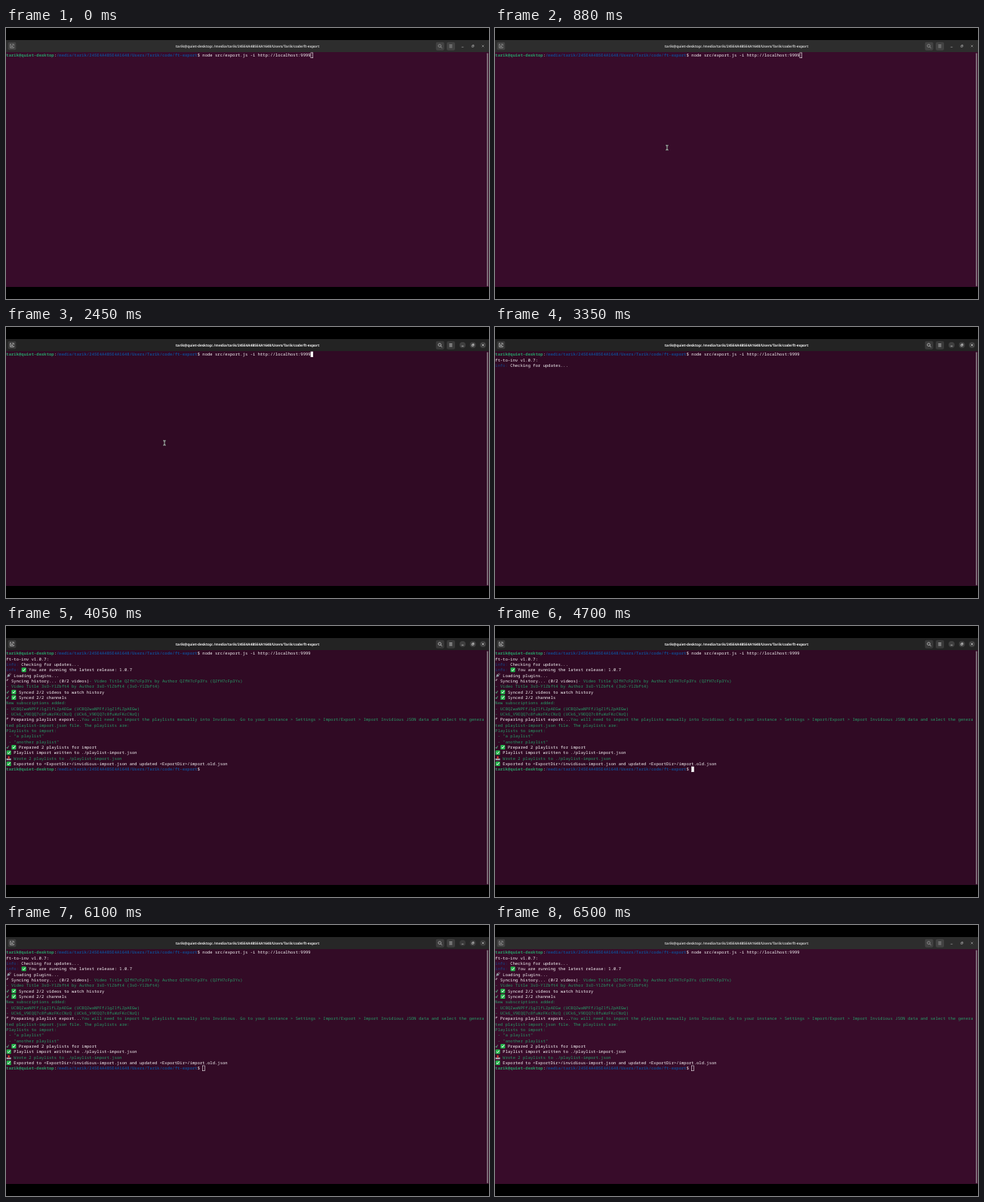
Write an HTML page that moves like this. It is 640 px wide and 360 px high and loops after 7.2 s.

```html
<!DOCTYPE html>
<html lang="en">
<head>
<meta charset="utf-8">
<title>Terminal session</title>
<style>
  html, body { margin: 0; width: 100%; height: 100%; overflow: hidden; background: #000; }
  svg { display: block; width: 100vw; height: 100vh; }
  text { white-space: pre; text-rendering: geometricPrecision; }
  #rows text { font: 16px "Noto Sans Mono", "DejaVu Sans Mono", monospace; letter-spacing: .4px; }
  #title { font: bold 14px "Noto Sans", "Open Sans", sans-serif; text-anchor: middle; }
  #rows .b { font-weight: bold; }
  .white { fill: #fff; }
  .green { fill: #26a269; }
  .blue { fill: #12488b; }
  .icon { fill: none; stroke: #dcdcdc; stroke-width: 2; }
</style>
</head>
<body>
<svg id="stage" viewBox="0 0 1920 1080" preserveAspectRatio="none">
  <rect width="1920" height="1080"/>
  <rect id="body" y="96" width="1920" height="936"/>
  <rect id="head" y="48" width="1920" height="48"/>
  <rect x="1911" y="100" width="6" height="930" rx="3" fill="#90858c" opacity=".75"/>
  <g id="tools" fill="#fff" fill-opacity=".1">
    <rect x="8" y="56" width="32" height="32" rx="6"/>
    <rect x="1709" y="56" width="33" height="33" rx="6"/>
    <rect x="1752" y="56" width="33" height="33" rx="6"/>
  </g>
  <g id="discs" fill="#fff" fill-opacity=".13">
    <circle cx="1815" cy="72" r="12"/>
    <circle cx="1856" cy="72" r="12"/>
    <circle cx="1896" cy="72" r="12"/>
  </g>
  <g id="icons" class="icon">
    <path d="M21 65h-4v14h14v-4M24 65h7v6M24 69v7M20.500 72.500h7"/>
    <path d="M1728.500 75.500l5 5"/><circle cx="1724" cy="71" r="5.500"/>
    <path d="M1762 67.500h12M1762 72.500h12M1762 77.500h12"/>
    <path d="M1811 76h8"/>
    <path d="M1852 70h6v6h-6zM1854 68h6v6"/>
    <path d="M1892 68l8 8M1900 68l-8 8"/>
  </g>
  <text id="title" x="960" y="77"></text>
  <g id="rows"></g>
  <rect id="cursor" stroke="#fff" stroke-width="1.600"/>
  <g id="mouse" fill="none" stroke-linecap="square">
    <path d="M-4-9h3l1 1 1-1h3M0-8V8M-4 9h3l1-1 1 1h3" stroke="#000" stroke-width="5"/>
    <path d="M-4-9h3l1 1 1-1h3M0-8V8M-4 9h3l1-1 1 1h3" stroke="#fff" stroke-width="2.400"/>
  </g>
</svg>
<script>
const LOOP = 7200, CELL_W = 10, CELL_H = 22, LEFT = 1, TOP = 98;
const $ = id => document.getElementById(id);
const host = 'tarik@quiet-desktop';
const path = '/media/tarik/245E4A4B5E4A1648/Users/Tarik/code/ft-export';

// Text runs and small pictures, each placed by terminal column
const esc = s => s.replace(/&/g, '&amp;').replace(/</g, '&lt;');
const run = (col, color, s) =>
  `<text x="${LEFT + col * CELL_W}" y="17" class="${color}">${esc(s)}</text>`;
const art = (col, shapes) => `<g transform="translate(${LEFT + col * CELL_W} 0)">${shapes}</g>`;
const white = (col, s) => run(col, 'white', s);
const green = (col, s) => run(col, 'green', s);
const info = () => run(0, 'blue', 'info:');
const check = col => art(col, '<rect x="1" y="2" width="18" height="18" rx="2.500" fill="#24b44b"/>' +
  '<path d="M5 11l4 4 7-9" fill="none" stroke="#fff" stroke-width="3"/>');
const tick = () => art(0, '<path d="M1.500 11l3 5 5-10" fill="none" stroke="#57c78c" stroke-width="2.400"/>');
const spinner = () => art(0, '<g fill="#fff"><circle cx="3" cy="5" r="1.500"/>' +
  '<circle cx="7" cy="5" r="1.500"/><circle cx="3" cy="9.500" r="1.500"/></g>');
const plug = () => art(0, '<path d="M3 19l5-5M12 6l4-4M15 9l4-4" stroke="#a9b2b6" stroke-width="2.400"/>' +
  '<path d="M9 5l7 7-4 4-6 0-2-2 1-5z" fill="#8b979d"/>');
const tray = () => art(0, '<path d="M1 12h18v7H1z" fill="#a3aeb5"/>' +
  '<path d="M10 2l6 6h-4v6H8V8H4z" fill="#e0413c"/>');
const done = s => tick() + check(2) + white(5, s);
const prompt = run(0, 'green b', host) + run(19, 'white', ':') +
  run(20, 'blue b', path) + white(76, '$');

const video = id => `- Video Title ${id} by Author ${id} (${id})`;
const channel = id => green(0, `- ${id} (${id})`);

// [time of appearance, content]
const rows = [
  [0, prompt + white(78, 'node src/export.js -i http://localhost:9999')],
  [3050, white(0, 'ft-to-inv v1.0.7:')],
  [3100, info() + white(6, 'Checking for updates...')],
  [3450, info() + check(6) + white(9, 'You are running the latest release: 1.0.7')],
  [3500, plug() + white(3, 'Loading plugins...')],
  [3550, spinner() + white(2, 'Syncing history... (0/2 videos)') + green(33, video('QZfH7cFp3Ys'))],
  [3550, green(0, video('3sO-Y1Zbft4'))],
  [3600, done('Synced 2/2 videos to watch history')],
  [3650, done('Synced 2/2 channels')],
  [3650, green(0, 'New subscriptions added:')],
  [3650, channel('UCBQZwaNPFfJ1gZ1fLZpAEGw')],
  [3650, channel('UCk6_V9EQQ7c8fuWzFKcCNzQ')],
  [3700, spinner() + white(2, 'Preparing playlist export...') +
    green(30, 'You will need to import the playlists manually into Invidious. Go to your instance' +
      ' > Settings > Import/Export > Import Invidious JSON data and select the genera')],
  [3700, green(0, 'ted playlist-import.json file. The playlists are:')],
  [3700, green(0, 'Playlists to import:')],
  [3700, green(1, '- "a playlist"')],
  [3700, green(1, '- "another playlist"')],
  [3750, done('Prepared 2 playlists for import')],
  [3750, check(0) + white(3, 'Playlist import written to ./playlist-import.json')],
  [3750, tray() + green(3, 'Wrote 2 playlists to ./playlist-import.json')],
  [3750, check(0) + white(3, 'Exported to <ExportDir>/invidious-import.json and updated <ExportDir>/import.old.json')],
  [3750, prompt]
];

$('title').textContent = `${host}: ${path}`;
$('rows').innerHTML = rows.map(([, html], i) =>
  `<g transform="translate(0 ${TOP + i * CELL_H})">${html}</g>`).join('');
const rowNodes = [...$('rows').children];

const ramp = (t, from, to) => Math.min(1, Math.max(0, (t - from) / (to - from)));
const ease = k => k * k * (3 - 2 * k);
const mix = (a, b, k) => `rgb(${a.map((v, i) => Math.round(v + (b[i] - v) * k))})`;
const show = (node, on) => node.setAttribute('visibility', on ? 'visible' : 'hidden');
const within = (t, spans) => spans.some(([a, b]) => t >= a && t < b);

// [from, row, column]
const cursorStops = [[0, 0, 121], [2700, 1, 0], [3050, 2, 0], [3100, 3, 0], [3750, 21, 78]];
const cursorOff = [[1750, 2350], [3300, 3750], [4050, 4700], [5300, 5900]];
// [start, end, x, y]
const mouseMoves = [[680, 880, 228, 159], [1180, 1450, 210, 154], [4720, 5420, 149, 340]];
const mouseOn = [[680, 2700], [4750, 5450]];

function drawWindow(t) {
  const focus = ease(ramp(t, 1180, 1480)) * (1 - ease(ramp(t, 5900, 6400)));
  $('body').setAttribute('fill', mix([56, 12, 42], [48, 10, 36], focus));
  $('head').setAttribute('fill', mix([45, 45, 45], [35, 35, 35], focus));
  $('title').setAttribute('fill', mix([205, 205, 205], [245, 245, 245], focus));
  $('discs').setAttribute('opacity', focus);
  $('icons').setAttribute('opacity', .65 + .35 * focus);
}

function drawCursor(t) {
  const node = $('cursor');
  const [, row, col] = cursorStops.filter(s => s[0] <= t).pop();
  const focused = t >= 1180 && t < 5900;
  node.setAttribute('x', LEFT + col * CELL_W + .8);
  node.setAttribute('y', TOP + row * CELL_H + .8);
  node.setAttribute('width', CELL_W - 1.6);
  node.setAttribute('height', CELL_H - 1.6);
  node.setAttribute('fill', focused ? '#fff' : 'none');
  show(node, !within(t, cursorOff));
}

function drawMouse(t) {
  let x = 143, y = 171;
  for (const [from, to, tx, ty] of mouseMoves) {
    const k = ease(ramp(t, from, to));
    x += (tx - x) * k;
    y += (ty - y) * k;
  }
  $('mouse').setAttribute('transform', `translate(${x * 3} ${y * 3})`);
  show($('mouse'), within(t, mouseOn));
}

function draw(t) {
  drawWindow(t);
  rowNodes.forEach((node, i) => show(node, t >= rows[i][0]));
  drawCursor(t);
  drawMouse(t);
}

const start = performance.now();
function tick60() {
  draw((performance.now() - start) % LOOP);
  requestAnimationFrame(tick60);
}
tick60();
</script>
</body>
</html>
```
